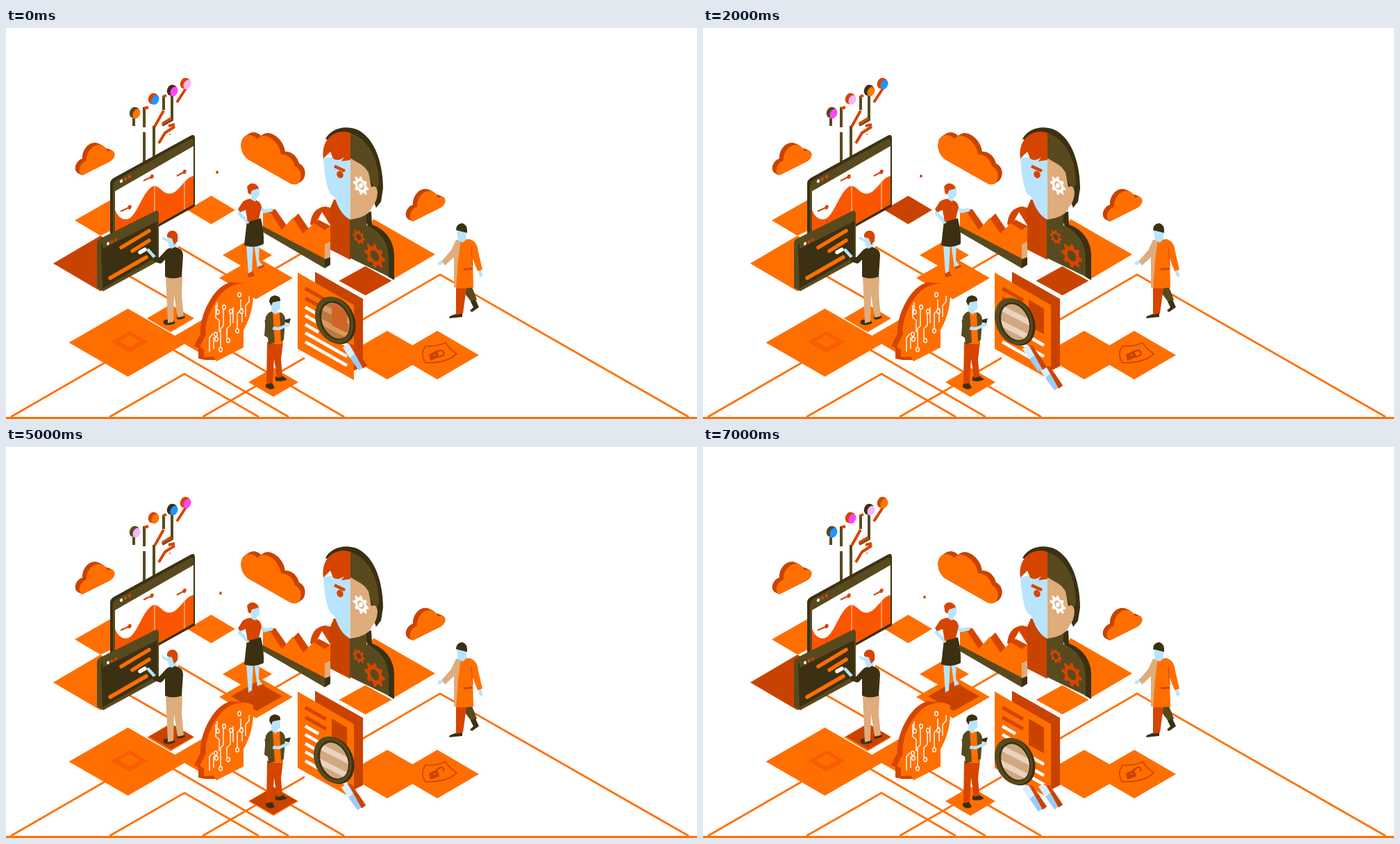
Write an HTML page with a canvas that moves like this. It is 995 by 563 pixels and loops after 8000 ms.

```html
<!DOCTYPE html>
<html lang="en">
<head>
<meta charset="utf-8">
<title>Isometric data lab</title>
<style>
html, body { margin: 0; width: 100%; height: 100%; overflow: hidden; background: #fff; }
canvas { display: block; width: 995px; height: 563px; }
</style>
</head>
<body>
<canvas id="stage" width="995" height="563"></canvas>
<script>
const ctx = document.getElementById('stage').getContext('2d');
const ORANGE = '#ff6f00', RED = '#d64500', RUST = '#c94300', OLIVE = '#584a1e',
  DARK = '#3b3011', SKIN = '#b9e4fd', TAN = '#dfac7c', WHITE = '#fff';
const POD_COLORS = ['#ff7800', '#1e96ff', '#ff46f5', '#f8b4ff'];

function fill(color, d) {
  ctx.fillStyle = color;
  ctx.fill(new Path2D(d));
}
function line(color, width, d, cap = 'butt') {
  ctx.strokeStyle = color;
  ctx.lineWidth = width;
  ctx.lineCap = cap;
  ctx.lineJoin = cap === 'round' ? 'round' : 'miter';
  ctx.stroke(new Path2D(d));
}
function oval(color, x, y, rx, ry = rx, turn = 0) {
  ctx.fillStyle = color;
  ctx.beginPath();
  ctx.ellipse(x, y, rx, ry, turn, 0, 7);
  ctx.fill();
}
function tile(color, x, y, w, h) {
  fill(color, `M${x - w},${y}L${x},${y - h}L${x + w},${y}L${x},${y + h}Z`);
}
function at(x, y, draw) {
  ctx.save();
  ctx.translate(x, y);
  draw();
  ctx.restore();
}

function floorLines() {
  line(ORANGE, 3, 'M0,561.5H995');
  line(ORANGE, 2.7, 'M7,560L175,463M149,560L257,498L364,560M240,463L407,560M325,466L487,560');
  line(ORANGE, 2.7, 'M283,560L430,475M510,422L625,355L983,560');
  line(ORANGE, 2.7, 'M170,353L240,393M248,315L320,357M380,351L430,322');
}

function tiles(s) {
  tile(s === 0 || s === 3 ? RUST : ORANGE, 136, 339, 68, 40);
  fill(ORANGE, 'M99,277L150,248L165,285L136,299Z');
  tile(s === 2 ? RUST : ORANGE, 295.5, 262, 34.5, 20.5);
  tile(ORANGE, 347.5, 327, 35.5, 20.5);
  tile(ORANGE, 360, 360, 53, 30.5);
  if (s % 2) tile(RUST, 361, 359, 37, 21);
  fill(ORANGE, 'M529,275L618,326L557,362L505,320Z');
  tile(s % 2 ? ORANGE : RUST, 517.5, 364, 38, 21);
  tile(ORANGE, 175.5, 453, 85, 49);
  tile(ORANGE, 290, 445, 50, 29);
  tile(ORANGE, 237, 418, 34, 20);
  if (s % 2) tile(RUST, 238, 417, 32, 18.5);
  tile(ORANGE, 385, 510, 36, 21);
  if (s === 1) tile(RUST, 385, 509.5, 34, 19.5);
  tile(ORANGE, 549, 471, 61, 35);
  tile(ORANGE, 621, 471, 60, 35);
}

function chip() {
  tile('#fa5c00', 178, 452, 27, 15.5);
  tile(ORANGE, 178, 451, 15, 9);
  const trace = '#f36500';
  for (let i = 0; i < 5; i++) {
    const a = i * 5, b = i * 3;
    line(trace, 0.8, `M${154 + a},${449 - b}l-9,-5h${-4 - i % 3 * 3}M${182 + a},${467 - b}l9,5h${4 + i % 3 * 4}`);
    line(trace, 0.8, `M${183 + a},${438 + b}l9,-5v${-1 - i % 2 * 2}M${155 + a},${456 + b}l-9,5v${2 + i % 2 * 2}`);
  }
}

function shield(open) {
  line(RED, 1.8, 'M600,466L604,458Q621,459 633,453Q638,462 649,469Q635,483 604,482Q599,475 600,466Z');
  fill(RUST, 'M609,470L621,464L624,474L611,479Z');
  line(RUST, 2.2, open ? 'M620,465L626,461Q632,461 630,467' : 'M620,466L626,464Q632,465 630,471L623,474');
  oval(ORANGE, 617, 471, 1.3);
}

function cloud(d, dx, dy) {
  for (let i = 0; i <= 1; i += 0.1) at(dx * i, dy * i, () => fill(RUST, d));
  fill(ORANGE, d);
}
function clouds() {
  const small = 'M110,212C102,208 106,194 116,191C115,177 128,163 140,170Q145,173 146,178C153,174 158,179 156,185Q154,190 148,193Z';
  cloud(small, -6, -3);
  at(476, 66.5, () => cloud(small, -6, -3));
  cloud('M408,223L350,190C337,182 336,164 342,158C349,151 358,155 362,160C369,148 393,160 396,182C406,181 414,190 416,199C425,203 427,214 422,222Q417,228 408,223Z', 6, -4);
}

function pods(s) {
  line(OLIVE, 4, 'M199,114V143M199,150V194M213,141V188M184,130V141M227,98V118M239,95V132L225,140');
  line(RED, 4, 'M214,142L227,119M265,78L246,107M220,166L229,151L243,142');
  line(RED, 4, 'M199,116L205,114M226,99L231,97M225,138L238,130M234,141L243,139');
  oval(RED, 236, 153, 1);
  [[186, 122], [213, 102], [240, 90], [259, 80]].forEach(([x, y], i) => {
    const side = i % 2 ? RED : i ? DARK : OLIVE;
    oval(side, x - 2, y - 0.5, 6, 8, 0.35);
    oval(side, x, y, 6, 8, 0.35);
    oval(POD_COLORS[(i - s + 4) % 4], x + 2, y + 1.5, 5, 7.3, 0.45);
  });
}

function chartWindow() {
  fill(DARK, 'M150,224Q150,219 155,216L266,155Q272,152 272,159V257L220,286L150,312Z');
  fill(OLIVE, 'M154,228Q154,222 159,219L265,160Q270,158 270,163V171L157,235V300H154Z');
  fill(WHITE, 'M157,235L270,170V250L157,314Z');
  fill('#fb5500', 'M157,262C162,274 170,278 178,274C190,266 197,236 211,228C221,224 226,242 239,238C251,234 257,216 270,213V254L157,318Z');
  line('#ffd9bd', 1, 'M214,228V286M257,219V261');
  line(RED, 1, 'M178,275V290');
  line(RED, 2, 'M198,220L210,214M246,213L257,207M165,264L178,258');
  [[210, 214], [257, 207], [178, 258]].forEach(([x, y]) => oval(RED, x, y, 2.5, 3.3, 0.4));
  [WHITE, RED, RED].forEach((c, i) => oval(c, 166 + i * 6, 220.5 - i * 3.2, 2, 2.6, 0.4));
}

function codeWindow() {
  fill(OLIVE, 'M131,310Q131,305 136,303L214,264Q220,261 220,268V330Q220,335 215,338L140,379L131,374Z');
  fill(DARK, 'M137,315Q137,310 142,308L213,270Q218,268 218,274V329L139,375Z');
  fill(OLIVE, 'M139,309L214,269Q218,268 218,274V278L139,318Z');
  [WHITE, RED, RED].forEach((c, i) => oval(c, 147 + i * 5.5, 310.5 - i * 2.7, 1.8, 2.5, 0.4));
  line(ORANGE, 5.5, 'M166,316L206,292M182,321L206,306M150,360L202,330', 'round');
  line(WHITE, 5.5, 'M193,323L200,319', 'round');
}

function coder() {
  fill(DARK, 'M227,421L239,418L244,425Q234,430 227,426ZM246,413L255,411L258,417Q251,421 246,419Z');
  fill(TAN, 'M230,357H254L253,385L256,415L247,417L242,384L241,423L233,425Z');
  line(SKIN, 4.5, 'M205,320L215,331', 'round');
  line(DARK, 8, 'M216,333L222,335L234,322', 'round');
  fill(DARK, 'M229,323Q234,315 243,315Q255,318 255,327L253,358Q240,363 229,358Z');
  fill(SKIN, 'M232,299L234,313L238,318L246,314L245,299Z');
  fill(RED, 'M232,297Q235,291 242,292Q249,294 247,307L242,312L239,303L232,301Z');
  line(SKIN, 3.5, 'M225,302L234,307');
}

function woman() {
  fill(SKIN, 'M346,311H356L354,352L349,354ZM357,310H365L364,334L370,343L362,345Z');
  fill(RED, 'M348,354L355,350L358,357L349,359ZM362,344L371,341L372,344L364,347Z');
  fill(DARK, 'M347,277L367,274Q372,295 371,311Q357,318 343,313Z');
  line(SKIN, 5, 'M341,261L336,267L348,279M366,259L372,264L382,262', 'round');
  fill(RED, 'M341,250Q350,244 357,247Q367,249 368,258L364,275L348,279L345,262L337,265L334,261Z');
  fill(SKIN, 'M353,233L365,231V241L361,245L359,250L353,247Z');
  fill(RED, 'M347,229Q350,223 357,224Q363,226 364,231L354,234L352,240Q347,238 348,233Z');
}

function areaChart() {
  fill(RED, 'M370,265L376,261L388,261L404,284L421,267L436,289L450,276L467,285V300L459,310L380,290Z');
  fill(ORANGE, 'M370,265L381,266L397,291L413,273L428,296L443,281L459,291V333L370,287Z');
  fill(OLIVE, 'M369,285L459,332V346L370,294Z');
  fill(ORANGE, 'M459,291L467,285V308L459,312Z');
  fill(TAN, 'M459,312L467,308V331L459,334Z');
  fill(DARK, 'M459,333L467,330V341L459,346Z');
}

function gear(color, x, y, r, hole) {
  ctx.save();
  ctx.transform(0.87, 0.4, 0, 1, x, y);
  ctx.beginPath();
  for (let i = 0; i < 32; i++) {
    const a = (i - 0.5) * Math.PI / 16, k = i % 4 < 2 ? r : r * 0.73;
    ctx.lineTo(Math.cos(a) * k, Math.sin(a) * k);
  }
  ctx.closePath();
  ctx.fillStyle = color;
  ctx.fill();
  oval(hole, 0, 0, r * 0.43);
  ctx.restore();
}

function bust() {
  fill(RED, 'M438,283Q440,259 460,257L472,260V247H496V334L467,319V284L455,265L444,285Z');
  fill(RUST, 'M466,261L472,247H496V333L467,319V284Z');
  fill(DARK, 'M514,268L526,264L527,283C546,290 559,306 559,328V363L550,358Z');
  fill(OLIVE, 'M495,272L519,268V284C539,292 551,310 551,331V358L495,331Z');
  fill(DARK, 'M460,160C467,146 486,139 505,146C532,158 543,197 543,231L540,250L533,259L526,240L495,170Z');
  fill(OLIVE, 'M495,151C522,159 537,189 537,224L533,235L525,220L514,199L495,193Z');
  fill(TAN, 'M495,187L507,194Q516,198 522,208L526,229Q534,225 535,237Q534,251 527,258Q523,272 495,276Z');
  fill(SKIN, 'M496,182L457,187Q459,224 467,239L473,243Q481,269 496,276Z');
  fill(RED, 'M496,151C477,144 453,157 457,188L467,178L471,188Q478,193 487,186L483,192L496,190Z');
  line(RED, 4.5, 'M473,199L488,206');
  oval(RED, 481, 211, 4.5, 5.5, -0.5);
  gear(WHITE, 511, 227, 13, TAN);
  oval(WHITE, 511, 227, 3, 3.8);
  gear(RED, 508, 301, 10, OLIVE);
  gear(RED, 531, 328, 17, OLIVE);
}

function circuitHead() {
  fill(RED, 'M277,476V461L271,458L280,440C278,416 298,371 324,366L346,368L305,478L287,478Z');
  fill(ORANGE, 'M285,474V463L279,459L288,441C285,420 302,382 324,372Q344,364 356,372C357,397 353,416 342,435V460L303,480L299,473Z');
  line(WHITE, 1.4, 'M293,466V446L298,440M302,399V417L307,421V438M313,405V429L309,433V459M323,411V428L318,433V447M333,433V411L338,406V391M345,416V400L350,394V386M299,445V462M327,402V425M304,407V395M340,424V403');
  [[336, 384], [314, 402], [305, 409], [324, 408], [339, 408], [302, 441], [320, 450], [309, 463], [303, 448], [333, 436]]
    .forEach(([x, y]) => {
      oval(WHITE, x, y, 3, 3.7);
      oval(ORANGE, x, y, 1.6, 2.3);
    });
}

function phoneMan() {
  fill(DARK, 'M374,513L382,509L387,518Q380,523 374,517ZM388,502L397,500L405,506Q398,510 388,508Z');
  fill(RED, 'M376,452H399L396,477L398,502L390,504L386,476L384,511L375,513Z');
  fill(ORANGE, 'M381,410H396L399,455H379Z');
  fill(OLIVE, 'M374,416Q378,408 384,408L387,453L378,456L377,446L372,443ZM394,409Q402,411 402,421L400,449L396,452Z');
  line(SKIN, 4.5, 'M380,432L393,433L407,427', 'round');
  line(OLIVE, 7, 'M376,420L377,431L384,433');
  fill(DARK, 'M402,420L410,418L408,425L402,424Z');
  fill(SKIN, 'M382,394H395V404L391,407L389,413L382,408Z');
  fill(DARK, 'M379,394Q379,386 387,385Q396,386 395,393L384,395L382,400Z');
}

function walker() {
  fill(OLIVE, 'M659,375L671,373L678,391L671,396L662,384Z');
  fill(DARK, 'M669,394L676,391L681,402L671,409L668,407L673,402ZM647,412L657,410L657,416L638,418L639,415Z');
  fill(RED, 'M648,373L663,375L658,411L648,413Z');
  line(SKIN, 5, 'M630,336L624,339M682,350L684,356', 'round');
  fill(TAN, 'M648,305H657L656,373L645,374V330L632,342L628,335L641,320Z');
  fill(ORANGE, 'M655,305L668,304Q679,308 680,322L686,348L679,350L672,332L673,374L648,375L651,335Z');
  fill(RED, 'M658,346L672,345V348L660,349Z');
  line(RED, 1, 'M670,315L672,342');
  fill(SKIN, 'M649,291H663V304L658,309L651,306Z');
  fill(DARK, 'M648,291Q648,282 657,281Q665,283 664,295Z');
}

function report() {
  fill(RUST, 'M445,351L514,390V487L502,493L445,460Z');
  fill(ORANGE, 'M420,352L501,399V507L420,462Z');
  fill(RUST, 'M469,391L491,404V441L469,429Z');
  line(RED, 5, 'M431,375L461,392M431,389L461,406');
  line(WHITE, 4.5, 'M431,402L450,413M431,414L450,425M431,427L450,438M431,439L491,473M431,452L491,486M470,445L491,457');
}

function handle() {
  fill('#9ccbfa', 'M11,39L20,34L43,66L34,72Z');
  fill('#d9f0ff', 'M11,39L19,34L28,48L21,54Z');
  fill(RED, 'M20,33L26,35L46,65L40,69Z');
  fill(RUST, 'M30,49L34,47L46,65L40,69Z');
}
function magnifier(s) {
  const [x, y] = [[474, 421], [472, 451], [449, 423], [449, 453]][s];
  // the lower grip stays behind in the last two poses
  if (s > 1) {
    ctx.save();
    ctx.beginPath();
    ctx.rect(480, 487, 60, 40);
    ctx.clip();
    at(472, 450, handle);
    ctx.restore();
  }
  at(x, y, () => {
    handle();
    oval(DARK, 2, 0.5, 26, 35, -0.4);
    oval(OLIVE, -1.5, -0.5, 26, 35, -0.4);
    oval(DARK, 0, 0, 21.5, 29, -0.4);
    ctx.save();
    ctx.beginPath();
    ctx.ellipse(0.5, 0.5, 19, 27, -0.4, 0, 7);
    ctx.clip();
    ctx.fillStyle = s ? '#cfa780' : '#b9783f';
    ctx.fillRect(-40, -40, 80, 80);
    line(s ? '#ead2bc' : '#d79a5f', 8, 'M-30,-25L35,8M-30,-3L35,30');
    if (!s) fill('#cf6426', 'M-5,-25L17,-12V18L-5,7Z');
    ctx.restore();
  });
}

function draw(s) {
  ctx.fillStyle = WHITE;
  ctx.fillRect(0, 0, 995, 563);
  floorLines();
  tiles(s);
  chip();
  shield(s % 2);
  clouds();
  pods(s);
  oval(RED, 304 + s * 5, 207.7 + s * 2.8, 1.8, 2.2);
  chartWindow();
  codeWindow();
  coder();
  bust();
  areaChart();
  woman();
  circuitHead();
  report();
  magnifier(s);
  phoneMan();
  walker();
}

let shown = -1;
function tick() {
  const step = Math.floor(performance.now() % 8000 / 1000) % 4;
  if (step !== shown) draw(shown = step);
  requestAnimationFrame(tick);
}
tick();
</script>
</body>
</html>
```
